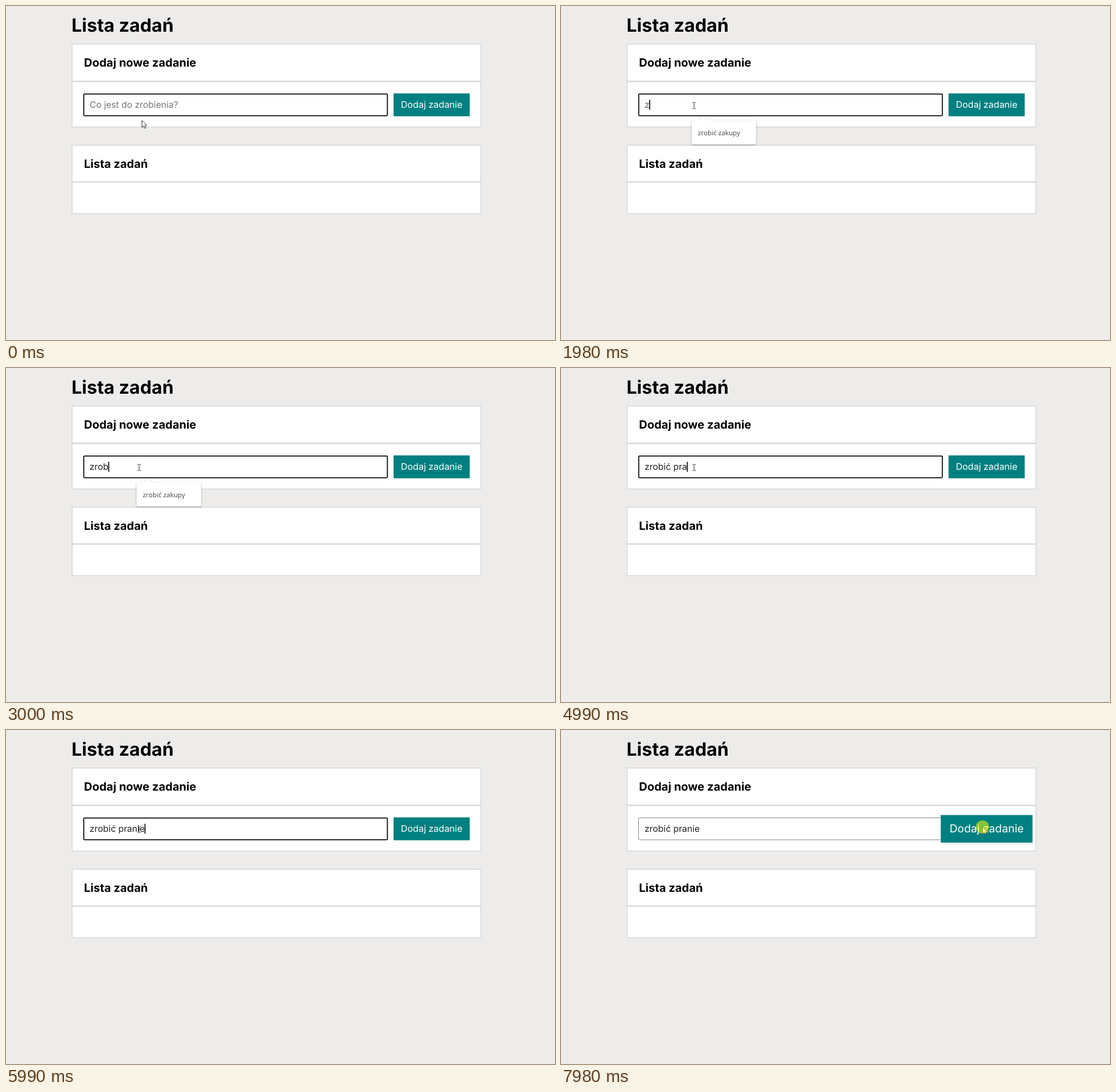
Write an HTML page that moves like this. It is 959 px wide and 584 px high and loops after 8 s.

```html
<!DOCTYPE html>
<html lang="pl">
<head>
<meta charset="utf-8">
<title>Lista zadań</title>
<style>
  html, body { margin: 0; width: 100%; height: 100%; overflow: hidden; background: #edecea; }
  svg { display: block; }
  text { font-family: Inter, "Open Sans", sans-serif; white-space: pre; text-rendering: geometricPrecision; }
  .head { font-weight: 700; font-size: 20px; }
  .card { fill: #fff; stroke: #ccc; }
  .line { fill: #d9d9d9; }
  #popup { filter: drop-shadow(0 1px 1.5px rgba(0, 0, 0, .35)); }
  #popup text { font: 11.7px "Open Sans", "Noto Sans", sans-serif; fill: #444; }
</style>
</head>
<body>
<svg width="959" height="584" viewBox="0 0 959 584">
  <text x="114.5" y="45" class="head" style="font-size:32px">Lista zadań</text>

  <rect class="card" x="115.5" y="66.5" width="714" height="145"/>
  <rect class="line" x="116" y="130.5" width="713" height="2.5"/>
  <text class="head" x="136.3" y="105.5">Dodaj nowe zadanie</text>

  <rect class="card" x="115.5" y="243.5" width="714" height="119.5"/>
  <rect class="line" x="116" y="306.5" width="713" height="2.5"/>
  <text class="head" x="136.3" y="282.5">Lista zadań</text>

  <rect id="focused" x="135.8" y="153.8" width="530.4" height="38" rx="1.5" fill="#fff" stroke="#101010" stroke-width="1.8"/>
  <rect id="blurred" x="135.5" y="153.5" width="531" height="38.5" rx="1.5" fill="#fff" stroke="#858585"/>
  <text id="value" x="146" y="178" font-size="15.6"></text>
  <rect id="caret" y="164" width="1.6" height="17.5"/>

  <g id="button">
    <rect x="-66.5" y="-20" width="133" height="40" fill="teal"/>
    <text y="5.2" font-size="16" fill="#fff" text-anchor="middle">Dodaj zadanie</text>
  </g>

  <g id="popup">
    <path d="M231 200H242L248.500 194L255 200H338Q341 200 341 203V239Q341 242 338 242H231Q228 242 228 239V203Q228 200 231 200Z" fill="#fff"/>
    <text x="239" y="226">zrobić zakupy</text>
  </g>

  <path id="beam" d="M229.500 168.500H231.500L232.500 169.500L233.500 168.500H235.500M232.500 169V179M229.500 179.500H231.500L232.500 178.500L233.500 179.500H235.500" fill="none" stroke="#333"/>
  <path id="arrow" d="M0 0V12.200L2.800 9.700L4.700 14L6.700 13.100L4.900 9H8.500Z" fill="#fff" stroke="#222" stroke-width=".9"/>
  <circle id="click" cx="736.300" cy="169.500" r="11.500" fill="#ff0" fill-opacity=".52"/>
</svg>
<script>
const LOOP = 8000;
const $ = id => document.getElementById(id);
const hint = "Co jest do zrobienia?";

// Each state holds until the next begins.
const states = [
  { at: 0, text: hint, color: "#757575", arrow: [237.5, 200] },
  { at: 1000, text: hint, color: "#757575" },
  { at: 1980, text: "z", color: "#666", caret: true, popup: true },
  { at: 3000, text: "zrob", caret: true, popup: true },
  { at: 3970, text: "zrobić ", caret: true, popup: true },
  { at: 4990, text: "zrobić pra", caret: true },
  { at: 5990, text: "zrobić pranie", caret: true },
  { at: 6980, text: "zrobić pranie", arrow: [730, 171], scale: 1.086 },
  { at: 7980, text: "zrobić pranie", arrow: [736.5, 169], scale: 1.205, click: true }
];

const show = (id, on) => { $(id).style.display = on ? "" : "none"; };

function render(s) {
  $("value").textContent = s.text;
  $("value").setAttribute("fill", s.color || "#222");
  $("caret").setAttribute("x", 145.5 + $("value").getComputedTextLength());
  $("button").setAttribute("transform", `translate(743.5 172.8) scale(${s.scale || 1})`);
  if (s.arrow) $("arrow").setAttribute("transform", `translate(${s.arrow})`);
  show("caret", s.caret);
  show("popup", s.popup);
  show("arrow", s.arrow);
  show("beam", !s.arrow);
  show("click", s.click);
  show("focused", !s.click);
  show("blurred", s.click);
}

const start = performance.now();
let current;
function tick() {
  const t = (performance.now() - start) % LOOP;
  const next = states.findLast(s => s.at <= t);
  if (next !== current) render(current = next);
  requestAnimationFrame(tick);
}
tick();
</script>
</body>
</html>
```
